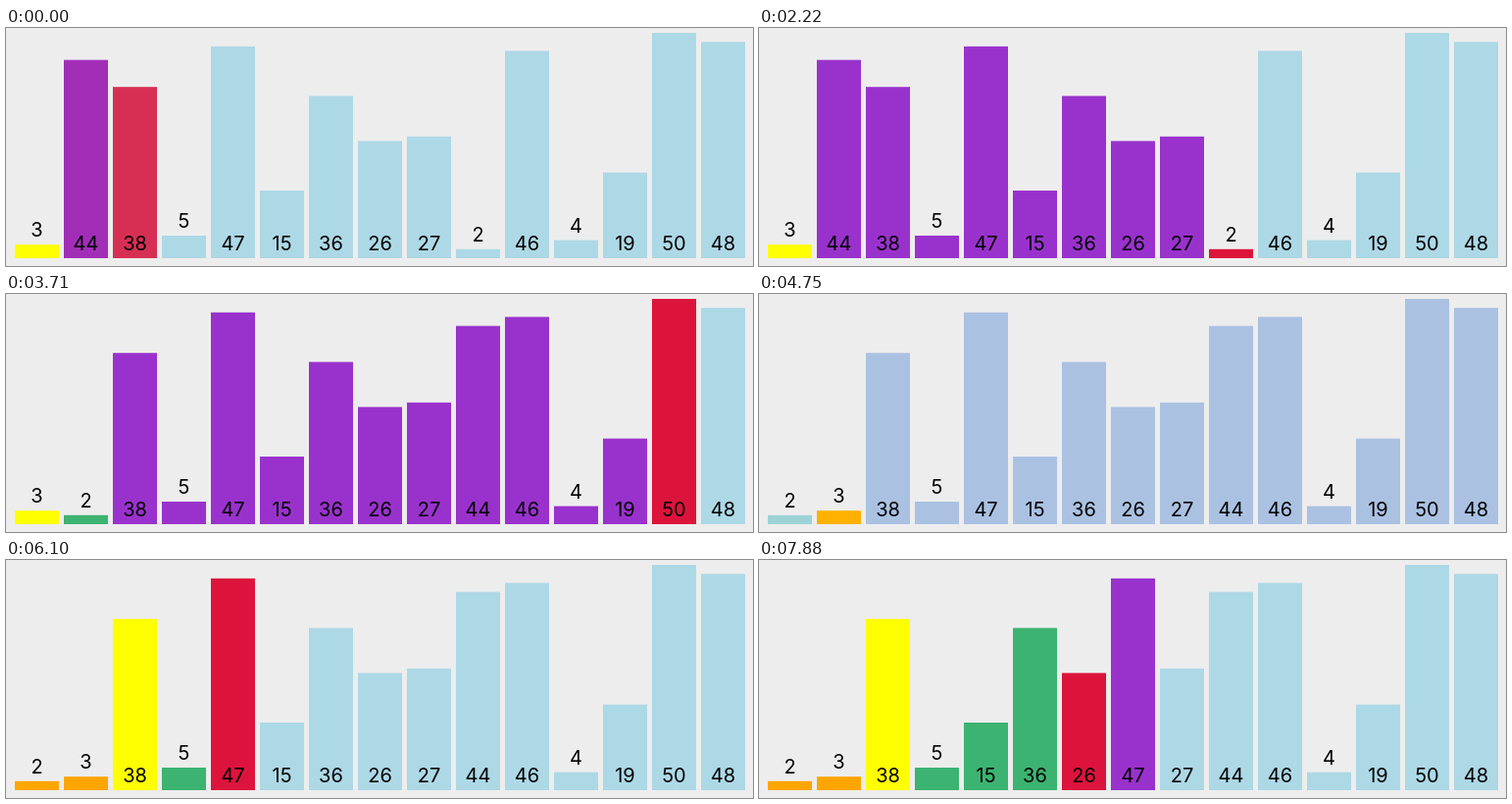
An HTML page for the animation above (8 s loop, 762 by 243 pixels).

```html
<!DOCTYPE html>
<html lang="en">
<head>
<meta charset="utf-8">
<title>Quick sort</title>
<style>
  html, body { margin: 0; width: 100%; height: 100%; overflow: hidden; background: #ededed; }
  svg { display: block; width: 762px; height: 243px; }
  text { font: 20px Inter, "Liberation Sans", sans-serif; text-anchor: middle; }
</style>
</head>
<body>
<svg id="chart" viewBox="0 0 762 243"></svg>
<script>
const VALUES = [3, 44, 38, 5, 47, 15, 36, 26, 27, 2, 46, 4, 19, 50, 48];
const COLORS = {
  idle: 'lightblue', check: 'crimson', pivot: 'yellow',
  small: 'mediumseagreen', big: 'darkorchid', sorted: 'orange'
};
const LEFT = 9, BASE = 235, PITCH = 50, WIDTH = 45, UNIT = 4.6;
const LOOP = 8000, TICK = 148.6, TICK_LEAD = 17;
const FIRST_STATE = 1; // the loop opens while the second state is giving way to the third

// Every state of the sort: where each bar stands and how it is coloured.
function recordSort(values) {
  const states = [];
  const order = values.map((_, i) => i);
  const colors = values.map(() => COLORS.idle);
  const paint = (slot, name) => { colors[order[slot]] = COLORS[name]; };
  const swap = (a, b) => { [order[a], order[b]] = [order[b], order[a]]; };
  const record = () =>
    states.push(values.map((_, bar) => ({ slot: order.indexOf(bar), color: colors[bar] })));

  function partition(lo, hi) {
    const pivot = values[order[lo]];
    let store = lo;
    paint(lo, 'pivot');
    record();
    for (let i = lo + 1; i <= hi; i++) {
      paint(i, 'check');
      record();
      if (values[order[i]] < pivot) {
        store++;
        if (i !== store) {
          swap(i, store);
          record();
        }
        paint(store, 'small');
      } else {
        paint(i, 'big');
      }
    }
    record();
    swap(lo, store);
    record();
    for (let i = lo; i <= hi; i++) paint(i, i === store ? 'sorted' : 'idle');
    record();
    return store;
  }

  function sort(lo, hi) {
    if (lo > hi) return;
    if (lo === hi) {
      paint(lo, 'sorted');
      record();
      return;
    }
    const middle = partition(lo, hi);
    sort(lo, middle - 1);
    sort(middle + 1, hi);
  }

  sort(0, values.length - 1);
  return states;
}

function add(parent, tag, attributes) {
  const node = document.createElementNS('http://www.w3.org/2000/svg', tag);
  for (const name in attributes) node.setAttribute(name, attributes[name]);
  return parent.appendChild(node);
}

function makeBar(value) {
  const height = value * UNIT;
  const group = add(chart, 'g', {});
  const rect = add(group, 'rect', { y: BASE - height, width: WIDTH, height });
  const labelBase = height > 30 ? BASE : BASE - height;
  add(group, 'text', { x: WIDTH / 2, y: labelBase - 8 }).textContent = value;
  return { group, rect };
}

const chart = document.getElementById('chart');
const states = recordSort(VALUES);
const bars = VALUES.map(makeBar);
const easeInOut = x => x < 0.5 ? 4 * x ** 3 : 1 - 4 * (1 - x) ** 3;

function draw() {
  // The picture is held for one tick; each step of the sort takes two.
  const tick = Math.floor((performance.now() % LOOP + TICK_LEAD) / TICK);
  const step = FIRST_STATE + Math.floor(tick / 2);
  const progress = easeInOut(Math.min(1, 0.675 + tick % 2));
  bars.forEach(({ group, rect }, i) => {
    const from = states[step][i], to = states[step + 1][i];
    const slot = from.slot + (to.slot - from.slot) * progress;
    group.setAttribute('transform', `translate(${LEFT + slot * PITCH} 0)`);
    rect.style.fill = `color-mix(in srgb, ${to.color} ${progress * 100}%, ${from.color})`;
  });
  requestAnimationFrame(draw);
}
draw();
</script>
</body>
</html>
```
